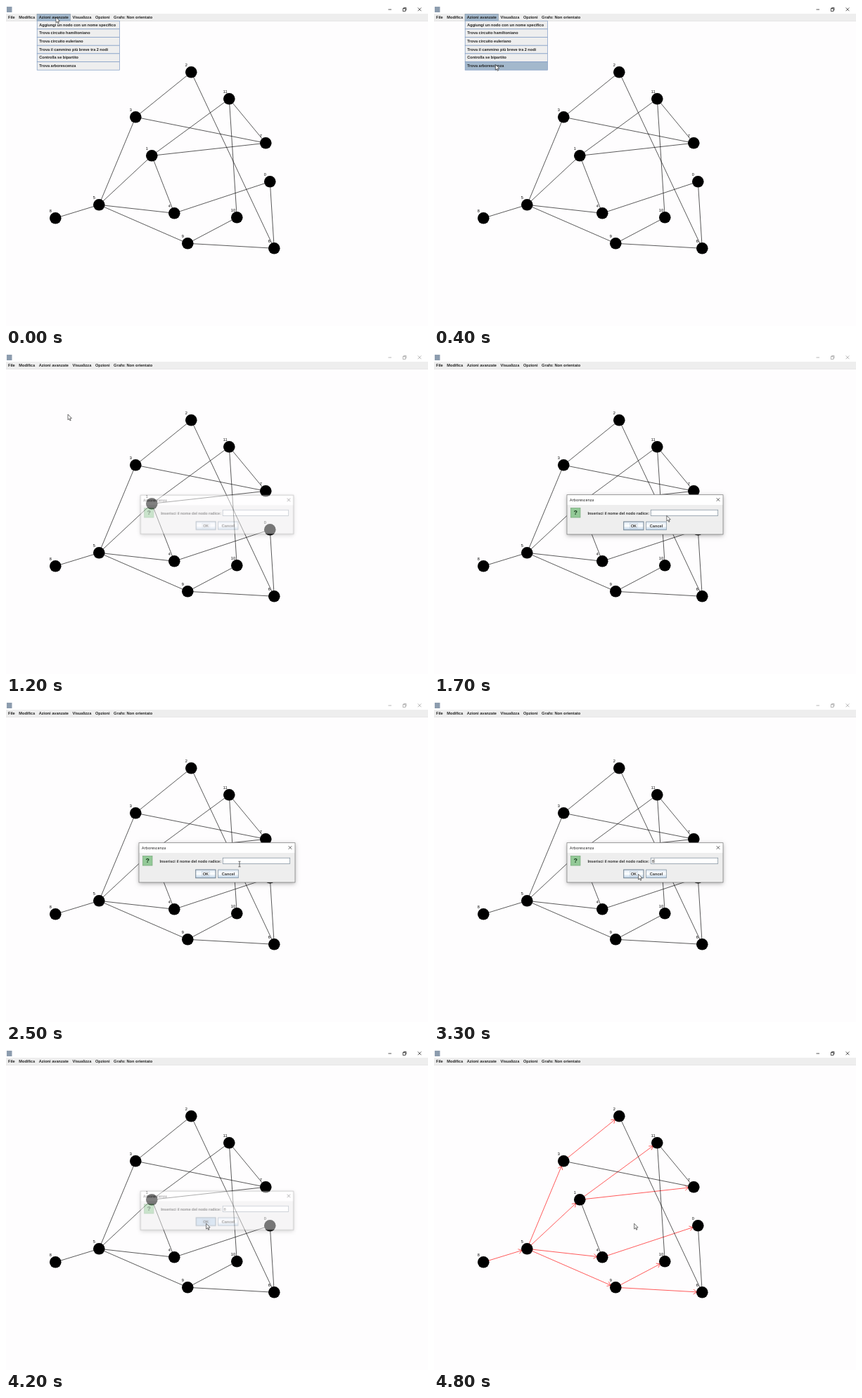
An HTML page with a canvas for the animation above (4900 ms loop, 600 by 456 pixels).

```html
<!DOCTYPE html>
<html lang="it">
<head>
<meta charset="utf-8">
<title>Arborescenza</title>
<style>
html, body { margin: 0; width: 100%; height: 100%; overflow: hidden; background: #fefdfe; }
canvas { display: block; width: 600px; height: 456px; }
</style>
</head>
<body>
<script>
const WIDTH = 600, HEIGHT = 456, LOOP = 4900, STEP = 100;
const ratio = window.devicePixelRatio || 1;

function makeContext() {
  const canvas = document.createElement('canvas');
  canvas.width = WIDTH * ratio;
  canvas.height = HEIGHT * ratio;
  const context = canvas.getContext('2d');
  context.scale(ratio, ratio);
  return context;
}

const stage = makeContext(), layer = makeContext();
document.body.append(stage.canvas);
let ctx = stage;

const SANS = '"Liberation Sans", Arial, sans-serif';
const BOLD = 'bold 5.63px ' + SANS, ITEM = 'bold 5.54px ' + SANS, PLAIN = '5.63px ' + SANS;
const SELECTED = '#a3b8cc', PANEL = '#eeeeee', BORDER = '#7a8a99';

const menus = ['File', 'Modifica', 'Azioni avanzate', 'Visualizza', 'Opzioni', 'Grafo: Non orientato'];
const actions = ['Aggiungi un nodo con un nome specifico', 'Trova circuito hamiltoniano',
  'Trova circuito euleriano', 'Trova il cammino più breve tra 2 nodi',
  'Controlla se bipartito', 'Trova arborescenza'];

// A node's name is its index.
const nodes = [[375, 250], [207, 213], [263, 94], [184, 158], [239, 295], [132, 283],
  [381, 345], [369, 195], [70, 302], [258, 338], [328, 301], [317, 132]];
const links = { 0: [4, 6], 1: [4, 5, 7, 11], 2: [3, 6], 3: [5, 7], 4: [5], 5: [8, 9],
  6: [9], 7: [11], 9: [10], 10: [11] };
const edges = Object.entries(links).flatMap(([a, ends]) => ends.map(b => [+a, b]));

// Breadth-first tree: maps each reached node to its parent.
function arborescence(root) {
  const parents = new Map([[root, null]]);
  for (const node of parents.keys()) {
    for (const [a, b] of edges) {
      if (a !== node && b !== node) continue;
      const other = a === node ? b : a;
      if (!parents.has(other)) parents.set(other, node);
    }
  }
  return parents;
}
const parents = arborescence(8);

const menuTitle = [71, 16], lastAction = [88, 86], textField = [332, 231], okButton = [284.7, 247.3];

function pointerAt(t) {
  const glide = (from, to, start, duration) => {
    const k = 1 - (1 - Math.min(Math.max((t - start) / duration, 0), 1)) ** 3;
    return from.map((v, i) => v + (to[i] - v) * k);
  };
  if (t < 1200) return glide(menuTitle, lastAction, 0, 600);
  if (t < 2800) return glide(lastAction, textField, 1200, 600);
  return glide(textField, okButton, 2800, 1000);
}

function rect(x, y, w, h, fill, stroke, width = 0.6) {
  if (fill) { ctx.fillStyle = fill; ctx.fillRect(x, y, w, h); }
  if (stroke) { ctx.strokeStyle = stroke; ctx.lineWidth = width; ctx.strokeRect(x, y, w, h); }
}

function line(points, color, width = 0.7) {
  ctx.beginPath();
  points.forEach(([x, y]) => ctx.lineTo(x, y));
  ctx.strokeStyle = color;
  ctx.lineWidth = width;
  ctx.stroke();
}

function text(s, x, y, font = BOLD, color = '#222', align = 'left') {
  ctx.font = font;
  ctx.fillStyle = color;
  ctx.textAlign = align;
  ctx.fillText(s, x, y);
}

function cross(x, y, r, color) {
  line([[x - r, y - r], [x + r, y + r]], color);
  line([[x - r, y + r], [x + r, y - r]], color);
}

function drawWindow(active, menuOpen) {
  rect(0, 0, WIDTH, HEIGHT, '#fefdfe');
  rect(0, 0, WIDTH, 11, '#fff');
  rect(1, 1, 7.5, 8, '#8c9cae');
  const color = active ? '#111' : '#999';
  line([[543.5, 5], [548, 5]], color);
  rect(564.3, 3.7, 3.6, 3.6, null, color, 0.7);
  line([[565.5, 3.7], [565.5, 2.5], [569, 2.5], [569, 6], [568, 6]], color);
  cross(588, 4.8, 2.4, color);

  rect(0, 11, WIDTH, 10.5, PANEL);
  line([[0, 21.5], [WIDTH, 21.5]], '#d8d8d8', 0.5);
  if (menuOpen) rect(44, 11.3, 47.5, 9.8, SELECTED, BORDER, 0.5);
  let x = 3;
  for (const name of menus) {
    text(name, x, 18);
    x += ctx.measureText(name).width + 5.6;
  }
}

function drawArc(a, b) {
  const [x0, y0] = nodes[a], [x1, y1] = nodes[b];
  const angle = Math.atan2(y1 - y0, x1 - x0);
  const back = (x, y, length, turn) =>
    [x - length * Math.cos(angle + turn), y - length * Math.sin(angle + turn)];
  const tip = back(x1, y1, 7.5, 0);
  line([nodes[a], tip], '#f00', 0.65);
  line([back(...tip, 6, 0.6), tip, back(...tip, 6, -0.6)], '#f00', 0.65);
}

function drawGraph(solved) {
  ctx.save();
  ctx.translate(0.3, 0.3);
  for (const [a, b] of edges) {
    if (solved && parents.get(b) === a) drawArc(a, b);
    else if (solved && parents.get(a) === b) drawArc(b, a);
    else line([nodes[a], nodes[b]], '#000', 0.65);
  }
  nodes.forEach(([x, y], name) => {
    ctx.beginPath();
    ctx.arc(x, y, 8.3, 0, 2 * Math.PI);
    ctx.fillStyle = '#000';
    ctx.fill();
    text(name, x - 8.5, y - 8.3, PLAIN, '#000');
  });
  ctx.restore();
}

function drawMenu(pointerY) {
  const row = 11.67;
  actions.forEach((label, i) => {
    const y = 21.2 + i * row;
    const hover = pointerY >= y && pointerY < y + row;
    rect(44.2, y, 117.3, row, hover ? SELECTED : PANEL, '#7f9bc4', 0.7);
    text(label, 47.3, y + 7.6, ITEM);
  });
}

function drawButton(label, x, w, isDefault, pressed) {
  const y = 239, h = 11.7;
  const fill = ctx.createLinearGradient(0, y, 0, y + h);
  const colors = pressed ? ['#b8cfe5'] : ['#dde8f3', '#fff', '#b8cfe5'];
  colors.forEach((color, i) => fill.addColorStop(i / 2, color));
  rect(x, y, w, h, fill, BORDER, isDefault ? 1.1 : 0.7);
  text(label, x + w / 2, y + 7.8, BOLD, '#333', 'center');
}

function drawDialog(typed, caret, pressed) {
  ctx.save();
  ctx.shadowColor = 'rgba(0,0,0,.3)';
  ctx.shadowBlur = 6 * ratio;
  ctx.shadowOffsetY = 1.5 * ratio;
  rect(189, 200.7, 222, 56.3, PANEL);
  ctx.restore();
  rect(189, 200.7, 222, 14.3, '#fff');
  rect(189, 200.7, 222, 56.3, null, '#777', 0.7);
  text('Arborescenza', 193, 209.7, '5.4px "Open Sans", sans-serif', '#111');
  cross(404, 207.5, 2.3, '#222');

  rect(194.5, 219.5, 13.5, 13.5, '#93c997', '#75a878', 0.7);
  text('?', 201.2, 229.3, 'bold 9px ' + SANS, '#173d1d', 'center');
  text('Inserisci il nome del nodo radice:', 306, 228.6, ITEM, '#333', 'right');
  rect(308.3, 222.2, 95.4, 8.3, '#fff', BORDER, 0.7);
  text(typed, 309.7, 228.5, PLAIN);
  const caretX = 309.9 + ctx.measureText(typed).width;
  if (caret) line([[caretX, 223.2], [caretX, 229.6]], '#333', 0.5);

  drawButton('OK', 269.7, 28.3, true, pressed);
  drawButton('Cancel', 301.7, 28.6, false, false);
  rect(278.2, 241.3, 11.4, 7.2, null, SELECTED, 0.4);
}

// Paints on the spare canvas, then blends it as one sheet around the dialog's centre.
function drawFaded(alpha, scale, paint) {
  ctx = layer;
  ctx.clearRect(0, 0, WIDTH, HEIGHT);
  paint();
  ctx = stage;
  ctx.save();
  ctx.globalAlpha = alpha;
  ctx.translate(300, 228.7);
  ctx.scale(scale, scale);
  ctx.drawImage(layer.canvas, -300, -228.7, WIDTH, HEIGHT);
  ctx.restore();
}

const arrow = new Path2D('M0 0V7.8L1.8 6.2 3 9 4.2 8.5 3 5.8 5.4 5.6Z');

function drawArrow(x, y) {
  ctx.save();
  ctx.translate(x, y);
  ctx.fillStyle = '#fff';
  ctx.fill(arrow);
  ctx.strokeStyle = '#111';
  ctx.lineWidth = 0.6;
  ctx.stroke(arrow);
  ctx.restore();
}

function drawTextCursor(x, y) {
  for (const end of [-3.8, 3.8]) line([[x - 1.6, y + end], [x + 1.6, y + end]], '#222', 0.6);
  line([[x, y - 3.8], [x, y + 3.8]], '#222', 0.7);
}

function draw(t) {
  const within = (from, to) => t >= from && t < to;
  const [x, y] = pointerAt(t);
  const menuOpen = t < 1100;
  drawWindow(!within(1200, 4200), menuOpen);
  drawGraph(t >= 4300);
  if (menuOpen) drawMenu(y);
  if (within(1200, 4300)) {
    const opaque = within(1300, 4200);
    const caret = within(1900, 2400) || within(2800, 3400);
    drawFaded(opaque ? 1 : 0.5, opaque ? 1 : 0.98,
      () => drawDialog(t >= 2800 ? '8' : '', caret, t >= 4000));
  }
  (within(1800, 2900) ? drawTextCursor : drawArrow)(x, y);
}

const start = performance.now();
function tick() {
  const t = (performance.now() - start) % LOOP;
  draw(Math.floor(t / STEP) * STEP);
  requestAnimationFrame(tick);
}
tick();
</script>
</body>
</html>
```
